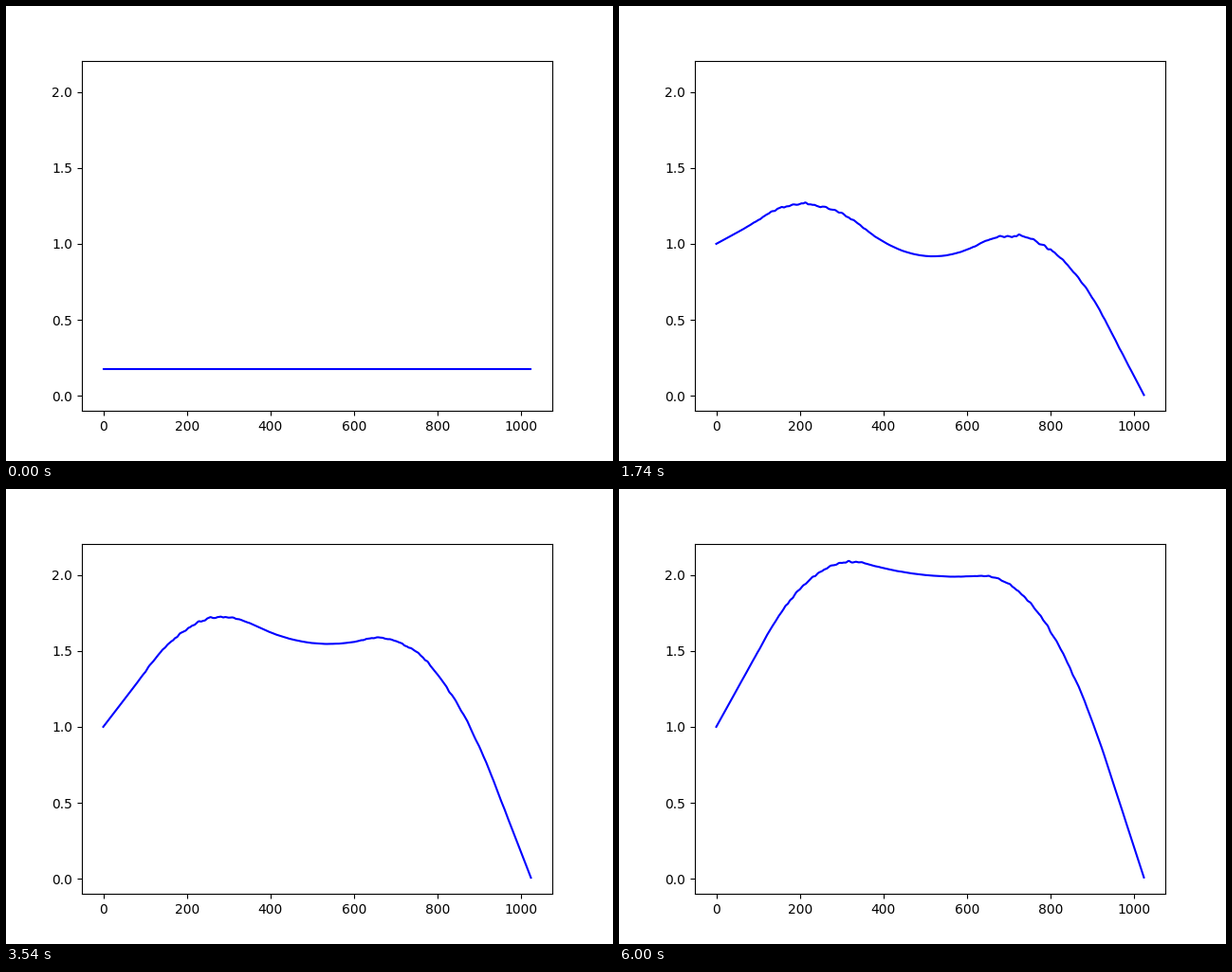
Animation, 640 px wide and 480 px high, one loop 6.06 s. Source, as a matplotlib script:

```python
import numpy as np
import matplotlib.pyplot as plt
from matplotlib.animation import FuncAnimation

FRAMES, INTERVAL = 101, 60
N = 1024
START = 0.175   # flat level before the ends are held at 1 and 0
TAU = 53        # decay time of the slowest mode, in frames

# Heated strips of the rod: centre, width, strength
HEATERS = [(0.23, 0.24, 1.32), (0.765, 0.30, 1.95)]

x = np.arange(N)
s = x / N
n = np.arange(1, 121)
modes = np.sin(np.pi * np.outer(s, n))

# Sine coefficients of the heat equation, relative to the line 1 - s
sign = (-1.0) ** n
first = -2 * ((1 - START) * (1 - sign) + sign) / (np.pi * n)
steady = sum(q * np.sin(np.pi * n * c) * np.sinc(n * w / 2)
             for c, w, q in HEATERS) / n ** 2


def level(k):
    """Mean profile at frame k."""
    if k == 0:
        return np.full(N, START)
    decay = np.exp(-n ** 2 * k / TAU)
    return 1 - s + modes @ (steady + (first - steady) * decay)


def make_ripples():
    """Fine jitter around the heaters, drifting from frame to frame."""
    rng = np.random.default_rng(7)
    kernel = np.hanning(15)
    kernel /= np.sqrt(np.sum(kernel ** 2))
    envelope = sum(np.exp(-((s - c) / w) ** 2 * 4) for c, w, _ in HEATERS)
    state, rows = np.zeros(N), []
    for k in range(FRAMES):
        fresh = np.convolve(rng.standard_normal(N), kernel, "same")
        state = 0.7 * (state + fresh)
        rows.append(0.004 * envelope * state * min(1, k / 10))
    return rows


ripples = make_ripples()

fig, ax = plt.subplots(figsize=(6.4, 4.8), dpi=100)
line, = ax.plot(x, level(0), color="b", lw=1.5)
ax.set_ylim(-0.1, 2.206)


def update(k):
    line.set_ydata(level(k) + ripples[k])
    return line,


anim = FuncAnimation(fig, update, frames=FRAMES, interval=INTERVAL,
                     repeat=True, repeat_delay=0)
plt.show()
```
